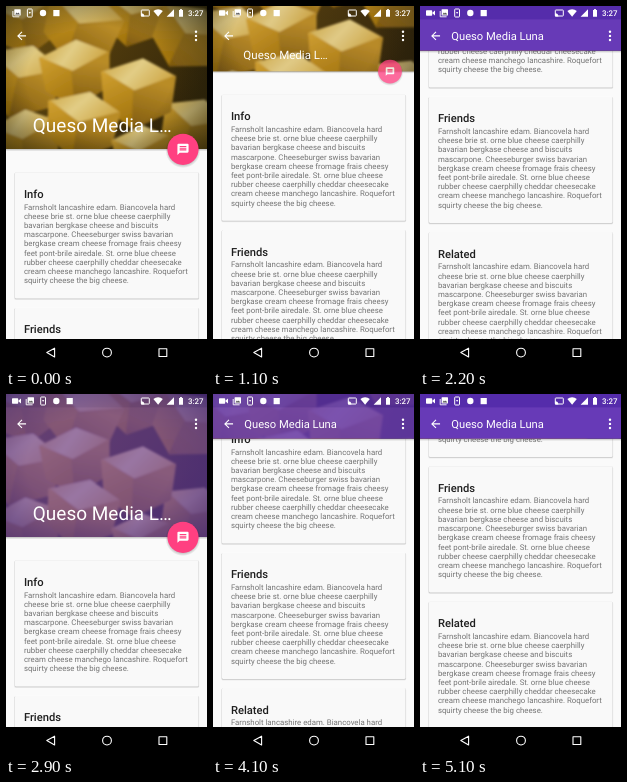
These frames come from a looping animation (201 by 360 pixels, 5200 ms). An HTML page:

```html
<!DOCTYPE html>
<html lang="en">
<head>
<meta charset="utf-8">
<title>Collapsing toolbar</title>
<style>
  html, body { margin: 0; width: 100%; height: 100%; overflow: hidden; background: #000; }
  svg { display: block; width: 100vw; height: 100vh; }
  text { font-family: Roboto, sans-serif; text-rendering: geometricPrecision; }
  .head { font-size: 11.2px; font-weight: 500; fill: #1f1f1f; }
  .body { font-size: 7.82px; fill: #737373; }
  .white { fill: #fff; }
  .line { fill: none; stroke: #fff; }
</style>
</head>
<body>
<svg viewBox="0 0 201 360">
  <defs>
    <clipPath id="barClip"><rect id="barRect" width="201" height="143"/></clipPath>
    <linearGradient id="gap" x2="1" y2=".5">
      <stop offset="0" stop-color="#6b4f10"/><stop offset="1" stop-color="#33260a"/>
    </linearGradient>
    <radialGradient id="dim" cx=".46" cy=".5" r=".72">
      <stop offset=".5" stop-color="#1c1a08" stop-opacity="0"/>
      <stop offset="1" stop-color="#1c1a08" stop-opacity=".72"/>
    </radialGradient>
    <linearGradient id="top" x2="1" y2=".4">
      <stop offset="0" stop-color="#cda542"/><stop offset=".5" stop-color="#e2cd86"/><stop offset="1" stop-color="#cfa848"/>
    </linearGradient>
    <linearGradient id="left" x2=".3" y2="1">
      <stop offset="0" stop-color="#cf9f30"/><stop offset="1" stop-color="#a5770f"/>
    </linearGradient>
    <linearGradient id="right" x2="-.2" y2="1">
      <stop offset="0" stop-color="#b98c28"/><stop offset="1" stop-color="#7f5a0e"/>
    </linearGradient>
    <linearGradient id="drop" x2="0" y2="1">
      <stop offset="0" stop-opacity=".24"/><stop offset="1" stop-opacity="0"/>
    </linearGradient>
    <radialGradient id="halo">
      <stop offset=".78" stop-opacity=".26"/><stop offset="1" stop-opacity="0"/>
    </radialGradient>
    <filter id="soft"><feGaussianBlur stdDeviation="1.1"/></filter>
  </defs>

  <rect width="201" height="360" fill="#fafafa"/>
  <g id="cards"></g>

  <rect id="barShadow" width="201" height="2.4" fill="url(#drop)"/>
  <g clip-path="url(#barClip)">
    <g id="photo">
      <rect width="201" height="145" fill="url(#gap)"/>
      <g id="cubes" filter="url(#soft)"></g>
      <rect width="201" height="145" fill="url(#dim)"/>
    </g>
    <g id="scrim">
      <rect width="201" height="143" fill="#673ab7"/>
      <rect width="201" height="13.4" fill="#552cab"/>
    </g>
  </g>

  <text id="title" class="white"></text>
  <path class="white" transform="translate(8.9 23.2) scale(.558)"
    d="M20 11H7.8l5.6-5.6L12 4l-8 8 8 8 1.4-1.4L7.8 13H20z"/>
  <g class="white">
    <circle cx="190" cy="25.8" r="1.2"/><circle cx="190" cy="29.9" r="1.2"/><circle cx="190" cy="34" r="1.2"/>
  </g>

  <g id="camera" class="white">
    <rect x="6" y="4.2" width="6.2" height="5.6" rx=".7"/>
    <path d="M12 7l3-2.6v5.2z"/>
  </g>
  <g id="notices">
    <path class="line" stroke-width=".9" d="M20.2 5v5.8h6.4"/>
    <rect class="white" x="21.6" y="3.2" width="6.4" height="6.2" rx=".5"/>
    <path d="M22.5 8.4l1.4-1.9 1 1.1.9-1 1.4 1.8z" fill="#555"/>
    <rect class="line" x="34.7" y="3" width="4.8" height="8" rx=".7"/>
    <path class="white" d="M36 6h2.2L37.1 8z"/>
    <circle class="white" cx="50.3" cy="7" r="3.2"/>
    <rect class="white" x="60.6" y="4" width="6.2" height="6.2"/>
  </g>
  <rect class="line" x="135.3" y="4" width="8" height="6" rx=".6"/>
  <path class="white" d="M135 7.2a3.4 3.4 0 0 1 3.4 3.4H135z"/>
  <path class="white" d="M147.4 5.1a7 7 0 0 1 9.4 0L152.1 10.8z"/>
  <path class="white" d="M168 3.3v7.4h-7.4z"/>
  <path class="white" d="M173 4h1.1v-.9h1.8V4h1.1v6.8h-4z"/>
  <text class="white" x="197.6" y="10" text-anchor="end" font-size="7.9" font-weight="500">3:27</text>

  <g id="fab">
    <circle cy="1.2" r="17.6" fill="url(#halo)"/>
    <circle r="15.6" fill="#ff4081"/>
    <path class="white" transform="scale(.558) translate(-12 -12)" fill-rule="evenodd"
      d="M20 2H4a2 2 0 0 0-2 2v18l4-4h14a2 2 0 0 0 2-2V4a2 2 0 0 0-2-2zM18 14H6v-2h12zM18 11H6V9h12zM18 8H6V6h12z"/>
  </g>

  <rect y="333" width="201" height="27" fill="#000"/>
  <g class="line" stroke-width="1.1" stroke-linejoin="round">
    <path d="M48.6 342.2v8.8l-7.8-4.4z"/>
    <circle cx="101" cy="346.6" r="4.4"/>
    <rect x="153" y="342.7" width="7.8" height="7.8"/>
  </g>
</svg>
<script>
const LOOP = 5200, STEP = 100;
const OPEN = 143, SHUT = 44.7, RANGE = OPEN - SHUT;
const PITCH = 135.4;
const $ = id => document.getElementById(id);

const copy = [
  'Farnsholt lancashire edam. Biancovela hard',
  'cheese brie st. orne blue cheese caerphilly',
  'bavarian bergkase cheese and biscuits',
  'mascarpone. Cheeseburger swiss bavarian',
  'bergkase cream cheese fromage frais cheesy',
  'feet pont-brile airedale. St. orne blue cheese',
  'rubber cheese caerphilly cheddar cheesecake',
  'cream cheese manchego lancashire. Roquefort',
  'squirty cheese the big cheese.'
];

const card = (name, i) => `<g transform="translate(0 ${166.3 + i * PITCH})">
  <rect x="8.3" y=".3" width="184.9" height="127.4" rx="1.6" fill="#000" opacity=".06"/>
  <rect x="8.7" y=".2" width="184.1" height="126.8" rx="1.3" fill="#000" opacity=".15"/>
  <rect x="9" width="183.5" height="126.2" rx="1.1" fill="#f9f9f9"/>
  <text class="head" x="17.9" y="25.7">${name}</text>
  ${copy.map((s, k) => `<text class="body" x="17.9" y="${37.3 + k * 9.21}">${s}</text>`).join('')}
</g>`;
$('cards').innerHTML = ['Info', 'Friends', 'Related'].map(card).join('');

// Cheese cubes, back to front: x, y, half size, turn
const cubes = [
  [20, 14, 34, -10], [128, 10, 30, 8], [182, 30, 34, 26],
  [76, 20, 37, 18], [16, 74, 38, 12], [70, 66, 34, -6], [188, 122, 32, 14],
  [132, 86, 36, 2], [20, 134, 32, -8], [76, 118, 35, 8], [136, 146, 28, -6]
];
const faces = [
  ['top', '-1,-.5 .1,-.9 1,-.45 -.1,0'],
  ['left', '-1,-.5 -.1,0 -.1,1 -.9,.45'],
  ['right', '-.1,0 1,-.45 .9,.5 -.1,1']
];
const cubeArt = faces.map(([id, p]) =>
  `<polygon points="${p}" fill="url(#${id})" stroke="url(#${id})" stroke-width=".08" stroke-linejoin="round"/>`).join('');
$('cubes').innerHTML = cubes.map(([x, y, r, a]) =>
  `<g transform="translate(${x} ${y}) rotate(${a}) scale(${r})">${cubeArt}</g>`).join('');

// Scroll position over time: [ms, px]
const scroll = [
  [0, 0], [500, 0], [700, 10], [900, 40], [1050, 67], [1100, 77.7], [1250, 104], [1500, 150],
  [1900, 196], [2200, 211], [2300, 208], [2500, 150], [2710, 66], [2900, 0], [3400, 0], [3500, 2.7],
  [3770, 67], [3900, 101], [4100, 143], [4400, 186], [4700, 205], [4800, 205], [5100, 229.5], [5200, 231]
];
const slope = i => (scroll[i + 1][1] - scroll[i][1]) / (scroll[i + 1][0] - scroll[i][0]);
const tangents = scroll.map((_, i) => {
  if (!i || i === scroll.length - 1) return 0;
  const a = slope(i - 1), b = slope(i);
  return a * b <= 0 ? 0 : 2 * a * b / (a + b);
});

function scrollAt(t) {
  let i = 0;
  while (i < scroll.length - 2 && t >= scroll[i + 1][0]) i++;
  const [t0, a] = scroll[i], [t1, b] = scroll[i + 1];
  const d = t1 - t0, u = (t - t0) / d, v = 1 - u;
  return a * v * v * (1 + 2 * u) + b * u * u * (3 - 2 * u)
    + d * u * v * (tangents[i] * v - tangents[i + 1] * u);
}

// cubic-bezier(.4, 0, .2, 1)
function ease(x) {
  if (x <= 0 || x >= 1) return x <= 0 ? 0 : 1;
  let lo = 0, hi = 1, p;
  for (let k = 0; k < 24; k++) {
    p = (lo + hi) / 2;
    const bx = 1.2 * p * (1 - p) ** 2 + .6 * p * p * (1 - p) + p ** 3;
    if (bx < x) lo = p; else hi = p;
  }
  return p * p * (3 - 2 * p);
}

// Moments when the bar counts as collapsed or expanded again
const toggles = [[1050, true], [2710, false], [3770, true]];
function collapsed(t, ms) {
  const last = toggles.filter(e => e[0] <= t).pop();
  if (!last) return 0;
  const v = ease((t - last[0]) / ms);
  return last[1] ? v : 1 - v;
}

const lerp = (a, b, u) => a + (b - a) * u;

function draw(t) {
  const s = scrollAt(t);
  const f = Math.min(1, s / RANGE);
  const bottom = OPEN - f * RANGE;

  $('cards').setAttribute('transform', `translate(0 ${-s})`);
  $('barRect').setAttribute('height', bottom);
  $('barShadow').setAttribute('y', bottom);
  $('photo').setAttribute('transform', `translate(0 ${-f * RANGE / 2})`);
  $('scrim').setAttribute('opacity', collapsed(t, 600));

  const title = $('title');
  title.textContent = f < 1 ? 'Queso Media L…' : 'Queso Media Luna';
  title.setAttribute('x', lerp(26.8, 31.3, f));
  title.setAttribute('y', lerp(126, 34, f));
  title.setAttribute('font-size', lerp(19, 11.2, 1 - (1 - f) ** 2));

  const shown = 1 - collapsed(t, 200);
  $('fab').setAttribute('transform', `translate(177 ${bottom + .3}) scale(${shown})`);
  $('fab').setAttribute('opacity', shown);

  const recording = t >= 300;
  $('camera').setAttribute('visibility', recording ? 'visible' : 'hidden');
  $('notices').setAttribute('transform', `translate(${recording ? 0 : -13.3} 0)`);
}

function tick() {
  const t = performance.now() % LOOP;
  draw(Math.floor(t / STEP) * STEP);
  requestAnimationFrame(tick);
}
draw(0);
requestAnimationFrame(tick);
</script>
</body>
</html>
```
